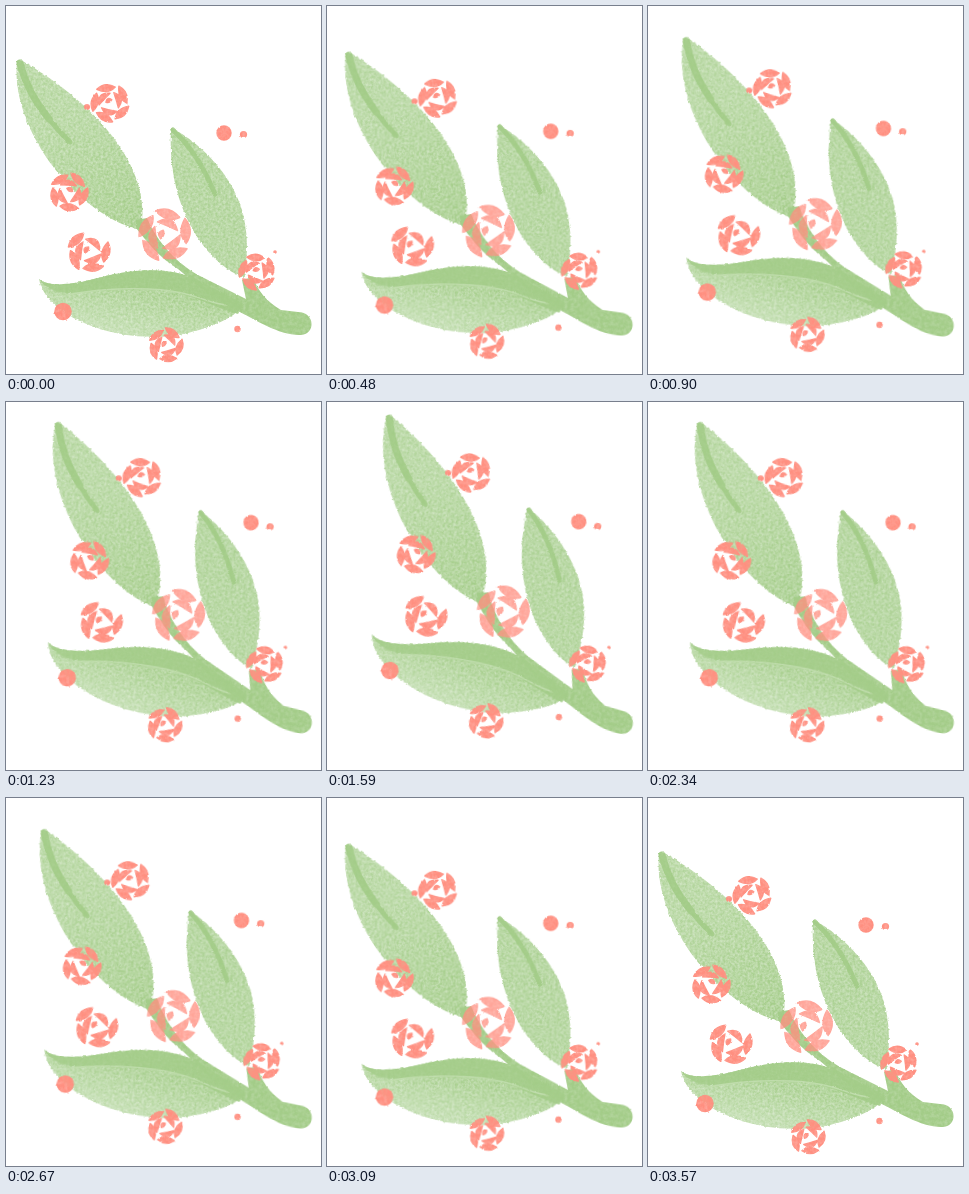
An HTML page that plays this animation: 315 px wide and 368 px high, repeating every 3.6 s.

```html
<!DOCTYPE html>
<html lang="en">
<head>
<meta charset="utf-8">
<title>Swaying branch</title>
<style>
  html, body { margin: 0; width: 100%; height: 100%; overflow: hidden; background: #fff; }
  svg { display: block; width: 315px; height: 368px; }
  .rib { fill: none; stroke: #a3cc88; stroke-linecap: round; }
  .wood { fill: #a3cc88; }
</style>
</head>
<body>
<svg viewBox="0 0 315 368">
  <defs>
    <filter id="chalk" filterUnits="userSpaceOnUse" x="0" y="0" width="325" height="368" color-interpolation-filters="sRGB">
      <feTurbulence type="fractalNoise" baseFrequency=".4" numOctaves="2" seed="4" result="noise"/>
      <feColorMatrix in="noise" values="0 0 0 0 0  0 0 0 0 0  0 0 0 0 0  0 0 0 .7 .48" result="grain"/>
      <feDisplacementMap in="SourceGraphic" in2="noise" scale="3" xChannelSelector="R" yChannelSelector="G"/>
      <feComposite in2="grain" operator="in"/>
    </filter>
    <filter id="brush" filterUnits="userSpaceOnUse" x="0" y="0" width="325" height="368" color-interpolation-filters="sRGB">
      <feTurbulence type="fractalNoise" baseFrequency=".3" numOctaves="2" seed="9" result="noise"/>
      <feColorMatrix in="noise" values="0 0 0 0 0  0 0 0 0 0  0 0 0 0 0  0 0 0 .4 .74" result="grain"/>
      <feDisplacementMap in="SourceGraphic" in2="noise" scale="2" xChannelSelector="R" yChannelSelector="G"/>
      <feComposite in2="grain" operator="in"/>
    </filter>
    <linearGradient id="low" gradientUnits="userSpaceOnUse" x1="135" y1="268" x2="122" y2="332">
      <stop offset=".25" stop-color="#a6ce8c"/>
      <stop offset="1" stop-color="#a6ce8c" stop-opacity=".7"/>
    </linearGradient>
    <linearGradient id="tall" gradientUnits="userSpaceOnUse" x1="30" y1="70" x2="130" y2="215">
      <stop offset=".3" stop-color="#a6ce8c" stop-opacity=".87"/>
      <stop offset="1" stop-color="#a3cc88"/>
    </linearGradient>
  </defs>
  <g id="branch">
    <g filter="url(#chalk)">
      <path fill="url(#tall)" d="M13 53C70 85 148 150 135 224C75 212 4 126 11 56Z"/>
      <path fill="#a6ce8c" fill-opacity=".93" d="M166 122C194 137 229 170 238 212Q244 242 238 272C198 256 161 200 165 124Z"/>
      <path fill="url(#low)" d="M33 273C42 281 66 279 92 272C132 261 166 262 190 273L238 298C229 314 194 326 165 330C106 336 40 310 33 273Z"/>
    </g>
    <g filter="url(#brush)">
      <path class="rib" stroke-width="7" d="M14 57C19 78 30 97 43 113"/>
      <path class="rib" stroke-width="5" d="M38 106Q50 123 64 136"/>
      <path class="rib" stroke-width="5" d="M167 124C186 142 197 160 209 188"/>
      <path class="wood" opacity=".85" d="M33 273C42 281 66 279 92 272C132 261 166 262 190 273L238 298L232 308C206 301 186 287 152 284C118 282 84 286 62 287Q42 286 33 273Z"/>
      <path class="rib" stroke-width="1.5" style="stroke:#c0ddad" d="M60 289C100 281 150 281 176 287S205 298 222 299"/>
      <path class="wood" d="M130 214L141 212C152 238 172 258 194 270L240 293L236 274L247 271C251 284 261 296 275 304L292 306C309 306 310 328 295 329C274 330 250 314 228 303C207 293 190 278 172 263C154 252 141 236 130 222Z"/>
    </g>
    <g id="blooms" filter="url(#brush)" fill="#ff8f80"></g>
  </g>
</svg>
<script>
const flowers = [
  { x: 104, y: 97, r: 19, turn: 10 },
  { x: 63, y: 186, r: 19, turn: 60 },
  { x: 83, y: 245, r: 21, turn: -25, count: 4 },
  { x: 159, y: 229, r: 26, turn: -40, fade: .8 },
  { x: 251, y: 266, r: 18, turn: 20 },
  { x: 160, y: 339, r: 17, turn: -20 }
];

// x, y, radius
const dots = [[218, 127, 7.7], [237.5, 128.5, 3.6], [57, 305.5, 8.7], [231.5, 323, 3.2], [81, 101, 3], [269, 246, 1.8]];

// A crescent that drifts inwards from its start to its end.
function petal(r, from, span, thick) {
  const at = (deg, d) => {
    const a = deg * Math.PI / 180;
    return `${(d * Math.cos(a)).toFixed(1)} ${(d * Math.sin(a)).toFixed(1)}`;
  };
  const mid = from + span / 2, bulge = r / Math.cos(span * Math.PI / 360);
  return `M${at(from, r)}Q${at(mid, bulge)} ${at(from + span, r * .88)}Q${at(mid, bulge - 2 * thick)} ${at(from, r)}Z`;
}

function rose({ x, y, r, turn, count = 5, fade = 1 }) {
  let d = "";
  for (let i = 0; i < count; i++) d += petal(r, turn + i * 72, 62, r * .36);
  for (let i = 0; i < 3; i++) d += petal(r * .58, turn + 40 + i * 120, 100, r * .27);
  d += petal(r * .22, turn + 180, 110, r * .2);
  return `<path transform="translate(${x} ${y})" opacity="${fade}" stroke="#ff8f80" stroke-width="1.4" stroke-linejoin="round" d="${d}"/>`;
}

const dot = ([x, y, r]) => `<circle cx="${x}" cy="${y}" r="${r}"/>`;

document.getElementById("blooms").innerHTML = flowers.map(rose).join("") + dots.map(dot).join("");

const branch = document.getElementById("branch");
const STEP = 30, STEPS = 120, SWING = 10;

function draw(now) {
  const step = Math.floor(now / STEP) % STEPS;
  const sway = (1 - Math.cos(2 * Math.PI * step / (STEPS - 1))) / 2;
  branch.setAttribute("transform", `rotate(${(SWING * sway).toFixed(3)} 278 322)`);
}

function tick() {
  draw(performance.now());
  requestAnimationFrame(tick);
}
tick();
</script>
</body>
</html>
```
